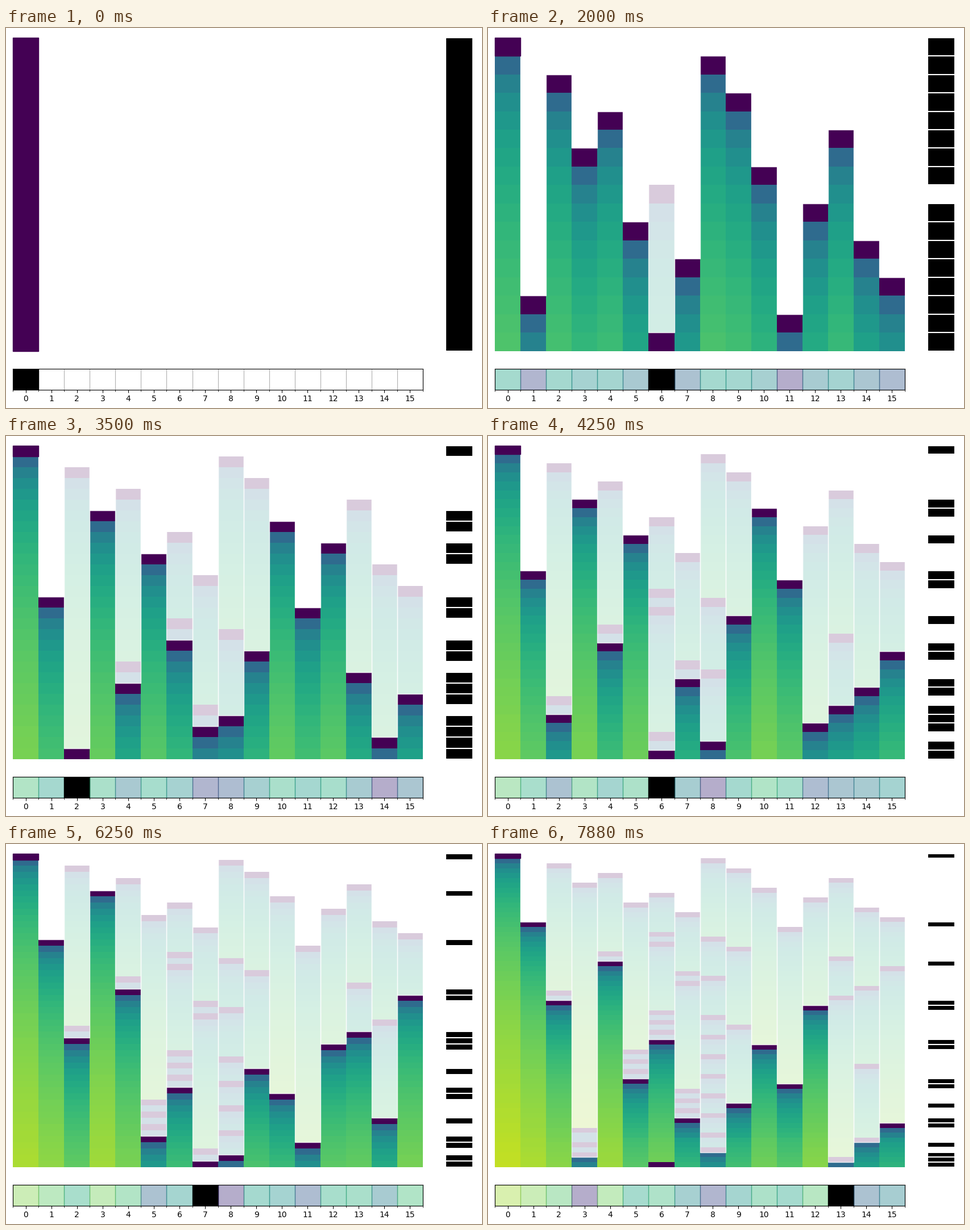
Recreate the animation shown at these times as a matplotlib script. Size 837 by 669 pixels, loop 8000 ms.

```python
import numpy as np
import matplotlib.pyplot as plt
from matplotlib.animation import FuncAnimation
from matplotlib.patches import Rectangle
from matplotlib.ticker import MultipleLocator, NullFormatter

W, H, DPI = 837, 669, 100
SITES, STEPS, SPAN = 16, 64, 128
LEFT, RIGHT, TOP, BOTTOM = 12.2, 732.9, 16.7, 568.55
SKIPPED = 58  # the history panel leaves out this step


def pairs(hot, others):
    """Interleave a repeatedly reused site with the sites between its writes."""
    return [site for other in others for site in (hot, other)]


# Site written at each step
writes = [0, 8, 2, 9, 4, 13, 3, 10, 6, 12, 5, 14, 7, 15, 1, 11]
writes += pairs(6, [8, 9]) + pairs(4, [13, 15])
writes += pairs(7, [8, 14]) + pairs(2, [13, 12])
writes += pairs(6, [8, 9, 8, 10]) + pairs(5, [8, 14, 8, 11])
writes += pairs(7, [8, 9, 8, 15]) + pairs(3, [8, 14, 8, 13])
writes += [6]


def age_table(sequence):
    ages = np.full((len(sequence), SITES), np.nan)
    age = np.full(SITES, np.nan)
    for row, site in enumerate(sequence):
        age += 1
        age[site] = 0
        ages[row] = age
    return ages


def symlog(age):
    """Linear up to one, logarithmic beyond, scaled to 0..1."""
    knee = 10 / 9
    raw = np.where(age <= 1, knee * age, knee + np.log10(np.maximum(age, 1)))
    return raw / (knee + np.log10(SPAN - 1))


viridis = plt.get_cmap("viridis").copy()
viridis.set_bad("white")
site_ages = age_table(writes)
history = np.delete(site_ages, SKIPPED, axis=0)
cells = viridis(np.ma.masked_invalid(symlog(history)))

fig = plt.figure(figsize=((W + 1e-4) / DPI, (H + 1e-4) / DPI), dpi=DPI, facecolor="white")


def add_axes(x0, y0, x1, y1):
    return fig.add_axes([x0 / W, 1 - y1 / H, (x1 - x0) / W, (y1 - y0) / H])


main = add_axes(LEFT, TOP, RIGHT, BOTTOM)
side = add_axes(773, TOP, 821, BOTTOM)
strip = add_axes(LEFT, 599.8, RIGHT, 636.6)

main.axis("off")
main.pcolormesh(np.arange(SITES + 1) - 0.5, np.arange(STEPS + 1), cells)
main.set_xlim(-0.5, SITES - 0.5)
main.add_patch(Rectangle((-0.5, 0), 1, 1, color=viridis(0.0), lw=1, zorder=4, clip_on=False))
side.axis("off")
side.set_xlim(0, 1)

strip.set_xlim(-0.5, SITES - 0.5)
strip.set_ylim(0, 1)
strip.set_yticks([])
strip.set_xticks(range(SITES))
strip.xaxis.set_minor_locator(MultipleLocator(1, offset=-0.5))
strip.xaxis.set_minor_formatter(NullFormatter())
strip.set_axisbelow(True)
strip.grid(which="minor", axis="x")
strip.tick_params(labelsize=10)

veils, bars, tiles = [], [], []
for s in range(SITES):
    veils.append(main.add_patch(Rectangle((s - 0.5, 0), 1, 1, fc="white", ec="white",
                                          lw=1, alpha=0.8, zorder=3, clip_on=False)))
    bars.append(side.add_patch(Rectangle((0, 0), 1, 1, fc="black", ec="white", lw=1.5)))
    tiles.append(strip.add_patch(Rectangle((s - 0.5, 0), 1, 1, lw=1)))


def update(step):
    rows = step + 1
    main.set_ylim(rows, 0)
    side.set_ylim(rows, 0)
    for s, age in enumerate(site_ages[step]):
        written = not np.isnan(age)
        bars[s].set_visible(written)
        tiles[s].set_visible(written)
        veils[s].set_visible(step > 0 and not (written and age == step))
        if not written:
            veils[s].set_y(1)
            veils[s].set_height(rows - 1)
            continue
        last = step - age
        veils[s].set_y(0)
        veils[s].set_height(last)
        bars[s].set_y(last)
        fresh = age == 0
        tiles[s].set_color("black" if fresh else viridis(np.log(age + 1) / np.log(SPAN)))
        tiles[s].set_alpha(1 if fresh else 0.4)
    return [*veils, *bars, *tiles]


anim = FuncAnimation(fig, update, frames=STEPS, interval=8000 / STEPS,
                     repeat=True, repeat_delay=0, blit=False)
plt.show()
```
